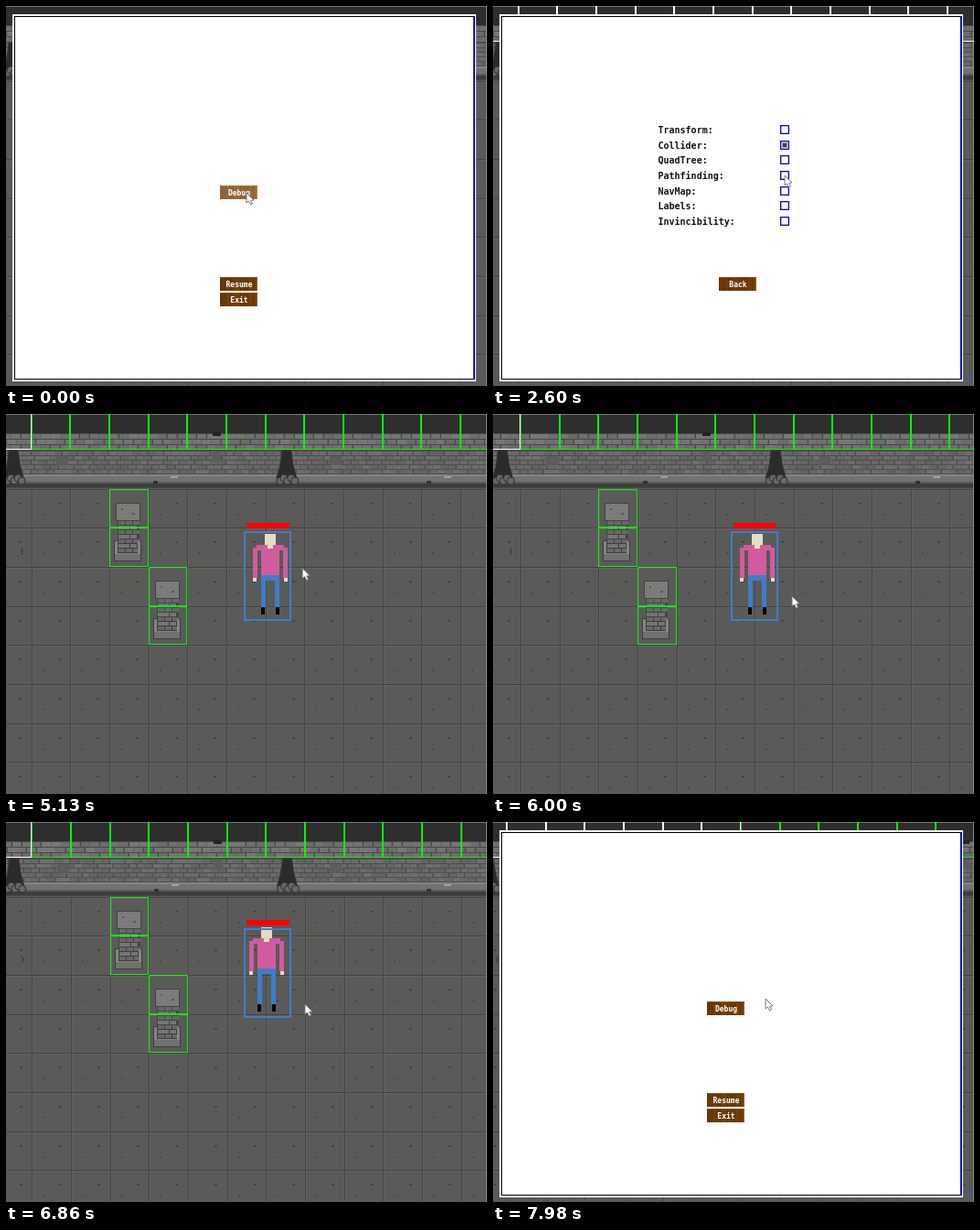
An HTML page with a canvas that plays this animation: 526x415 px, repeating every 8000 ms.

```html
<!DOCTYPE html>
<html lang="en">
<head>
<meta charset="utf-8">
<title>Debug menu</title>
<style>
html, body { margin: 0; width: 100%; height: 100%; overflow: hidden; background: #5a5a58; }
canvas { display: block; }
</style>
</head>
<body>
<canvas id="stage" width="526" height="415"></canvas>
<script>
const W = 526, H = 415, LOOP = 8000, TILE = 128 / 3, TOP = 39;
const c = document.getElementById('stage').getContext('2d');
const GREEN = '#0cf20c', BLUE = '#3d7dcb', PINK = '#d25b9d', SKIN = '#e6dcc2';
const LABELS = ['Transform:', 'Collider:', 'QuadTree:', 'Pathfinding:', 'NavMap:', 'Labels:', 'Invincibility:'];
const OPEN_DEBUG = 210, CHECK = 1760, RESUME = 5100, PAUSE = 7580;

// each move: start, duration, dx, dy
const POINTER = [
  [640, 730, 50, -46], [1370, 210, 5, -7], [2070, 530, 1, 34], [3040, 990, 3, -6],
  [4270, 410, 2, -12], [RESUME, 610, 3, 32], [PAUSE, 400, -29, -6]
];
// camera shift in thirds of a pixel, and the player's climb
const WALK = [[5910, 400, 59, 0], [6490, 370, -57, -12], [7000, 400, -40, 0]];

const noise = n => { const s = Math.sin(n * 12.9898 + 4) * 43758.5453; return s - Math.floor(s); };
const gray = v => `rgb(${v},${v},${v})`;

function travel(x, y, moves, t, steps = 100) {
  for (const [start, span, dx, dy] of moves) {
    const raw = Math.max(0, Math.min(1, (t - start) / span));
    const p = Math.floor(raw * steps + 0.01) / steps;
    x += dx * p;
    y += dy * p;
  }
  return [x, y];
}

function rect(x, y, w, h, color) {
  c.fillStyle = color;
  c.fillRect(Math.round(x), Math.round(y), w, h);
}

function outline(x, y, w, h, color, lw = 1) {
  c.strokeStyle = color;
  c.lineWidth = lw;
  c.strokeRect(x + lw / 2, y + lw / 2, w - lw, h - lw);
}

function shape(path, fill, stroke) {
  c.fillStyle = fill;
  c.fill(path);
  c.strokeStyle = stroke;
  c.lineWidth = 1;
  c.stroke(path);
}

function bricks(ox, y, rows, h, w, shade) {
  for (let r = 0; r < rows; r++) {
    for (let i = -6; i * w < W + 20; i++) {
      const n = noise(i * 7 + r * 31);
      rect(ox + (i + r % 2 / 2) * w, y + r * h, n > 0.85 ? w : w - 1, h - 1, gray(shade + Math.floor(n * 14)));
    }
  }
}

function drawFloor(ox) {
  rect(0, 80, W, H - 80, '#5a5a58');
  for (let r = 1; r < 9; r++) {
    const y = TOP + r * TILE;
    rect(0, y, W, 1, '#424240');
    rect(0, y + 1, W, 1, '#636361');
    for (let k = -2; k < 13; k++) {
      const x = ox + k * TILE;
      rect(x, y, 1, 43, '#464644');
      rect(x + 1, y + 1, 1, 42, '#61615f');
      rect(x + 29, y + 15, 3, 2, '#444');
      rect(x + 12, y + 27, 2, 2, '#4a4a4a');
      rect(x + 27, y + 31, 2, 1, '#4a4a4a');
    }
  }
  for (let i = 0; i < 4; i++) rect(ox - 14 + 5 * noise(i), 146 + 2 * i, 2, 2, '#444');
  for (const r of [4, 8]) {
    rect(ox - 76, 33 + r * TILE, 44, 53, '#2b2b2b');
    rect(ox - 76, 33 + r * TILE, 44, 14, '#3a3a3a');
  }
}

function drawWall(ox) {
  rect(0, 0, W, 21, '#2e2e2e');
  rect(0, 21, W, 60, '#484848');
  bricks(ox, 22, 3, 6, TILE / 4, 106);
  rect(0, 40, W, 27, '#4f4f4f');
  bricks(ox, 41, 5, 5, TILE / 5, 98);
  rect(0, 66, W, 10, '#727272');
  rect(0, 66, W, 2, '#858585');
  rect(0, 74, W, 2, '#5a5a5a');
  rect(0, 76, W, 4, '#3c3c3c');
  for (let i = -1; i < 3; i++) crack(ox - 19.5 + i * 7 * TILE);
}

function crack(x) {
  rect(x + 47, 46, 13, 10, '#5c5c5c');
  rect(x + 218, 41, 9, 10, '#5c5c5c');
  rect(x + 172, 68, 8, 2, '#a0a0a0');
  rect(x + 153, 73, 5, 3, '#303030');
  rect(x + 218, 20, 9, 4, '#242424');
  shape(new Path2D(`M${x - 5} 40h10l2 15 4 15h-22l4-14z`), '#2b2b2b', '#333');
  for (let i = 0; i < 5; i++) {
    const rock = new Path2D();
    rock.arc(x - 7 + i * 4, 73 - i % 2 * 3, 4, 0, 7);
    shape(rock, '#686868', '#303030');
  }
}

function drawColumn(x, y) {
  rect(x + 7, y + 15, 27, 20, '#424242');
  rect(x + 8, y + 16, 25, 18, '#7b7b7b');
  rect(x + 13, y + 21, 2, 2, '#5a5a5a');
  rect(x + 25, y + 26, 3, 2, '#5a5a5a');
  rect(x + 9, y + 34, 24, 24, '#444');
  rect(x + 5, y + 56, 30, 23, '#3c3c3c');
  for (let r = 0; r < 7; r++)
    for (let i = 0; i < 3; i++) rect(x + 10 + i * 8 - (r % 2 && i ? 3 : 0), y + 35 + r * 5, 7, 4, gray(104 + r % 2 * 12));
  for (const dx of [6, 31]) rect(x + dx, y + 57, 3, 15, '#858585');
  rect(x + 6, y + 70, 28, 8, '#707070');
  rect(x + 6, y + 70, 28, 1, '#858585');
}

// neighbouring tiles share an edge, which makes two-pixel lines
function collider(ox, k, row, color) {
  const x = Math.round(ox + k * TILE), y = Math.round(TOP + row * TILE);
  outline(x, y, Math.round(ox + (k + 1) * TILE) - x, Math.round(TOP + (row + 1) * TILE) - y, color);
}

function drawColliders(ox, t) {
  const firstActive = t < RESUME ? 99 : t > 7200 ? 6 : 0;
  for (let k = -2; k < 13; k++) collider(ox, k, -1, k < firstActive ? '#fff' : GREEN);
  for (const k of [2, 3])
    for (const half of [0, 1]) collider(ox, k, 2 * k - 3 + half, GREEN);
}

function drawPlayer(y, stretch) {
  const x = 289 - stretch, by = y - stretch;
  const pair = (dx, py, w, h, color) => {
    rect(x - dx, py, w, h, color);
    rect(x + dx - w, py, w, h, color);
  };
  rect(263, 119 + y, 47, 6, '#f00');
  rect(x - 6, 131 + by, 12, 13, SKIN);
  rect(x - 15, 143 + by, 30, 6, PINK);
  rect(x - 10, 143 + by, 20, 33, PINK);
  rect(x - 3, 143 + by, 6, 4, SKIN);
  pair(19, 146 + by, 5, 33, PINK);
  pair(19, 179 + by, 4, 4, SKIN);
  rect(x - 10, 176 + by, 20, 6, BLUE);
  pair(10, 181 + by, 5, 30 + stretch, BLUE);
  pair(10, 211 + y, 4, 8, '#050505');
  outline(260, 128 + y, 52, 98, BLUE, 2);
}

function text(s, x, y, size, color, align) {
  c.font = `bold ${size}px "DejaVu Sans Mono", monospace`;
  c.textAlign = align;
  c.fillStyle = color;
  c.fillText(s, x, y);
}

function button(label, x, y, hover) {
  rect(x, y, 41, 15, hover ? '#99693a' : '#713f08');
  for (let i = 0; i < 41; i += 2)
    if (noise(i + 3) > 0.4) rect(x + i, y, 1, 15, hover ? '#8a5c31' : '#5e3006');
  rect(x + 40, y, 1, 15, hover ? '#b98a50' : '#9a6420');
  rect(x, y, 41, 1, hover ? '#a87a48' : '#84501a');
  text(label, x + 21, y + 11, 8, '#fff', 'center');
}

function drawPanel() {
  rect(7, 9, 507, 401, '#fff');
  outline(9, 11, 503, 397, '#000');
  rect(511, 11, 2, 397, '#0000b4');
}

function mainMenu(hover) {
  button('Debug', 234, 196, hover);
  button('Resume', 234, 296);
  button('Exit', 234, 313);
}

function debugMenu(checked) {
  LABELS.forEach((label, i) => {
    const y = Math.round(130 + i * 16.67);
    text(label, 180.5, y + 9, 10, '#111', 'left');
    outline(314, y, 10, 10, '#0000e0', 1.3);
    if (label === 'Collider:' && checked) {
      outline(316, y + 2, 6, 6, '#a8a39b');
      rect(317, y + 3, 4, 4, '#65390b');
    }
  });
  button('Back', 247, 296);
}

function drawPointer([x, y]) {
  shape(new Path2D(`M${x} ${y}v11l2.5-2 2 4 2-1-1.8-3.7 3.3-.3z`), '#fff', '#777');
}

function draw(t) {
  const [shift, climb] = travel(83, 0, WALK, t, 8);
  const ox = Math.round(shift) / 3;
  drawFloor(ox);
  drawWall(ox);
  for (const k of [2, 3]) drawColumn(ox + k * TILE, TOP + (2 * k - 3) * TILE);
  rect(0, 0, W, 1, '#777');
  rect(W - 1, 0, 1, H, '#888');
  if (t >= CHECK) drawColliders(ox, t);
  if (t >= RESUME && t < PAUSE) drawPlayer(Math.round(climb), climb ? 4 : 0);
  else {
    drawPanel();
    if (t >= OPEN_DEBUG && t < RESUME) debugMenu(t >= CHECK);
    else mainMenu(t < OPEN_DEBUG);
  }
  drawPointer(travel(263, 204, POINTER, t));
}

function frame() {
  draw(performance.now() % LOOP);
  requestAnimationFrame(frame);
}
frame();
</script>
</body>
</html>
```
